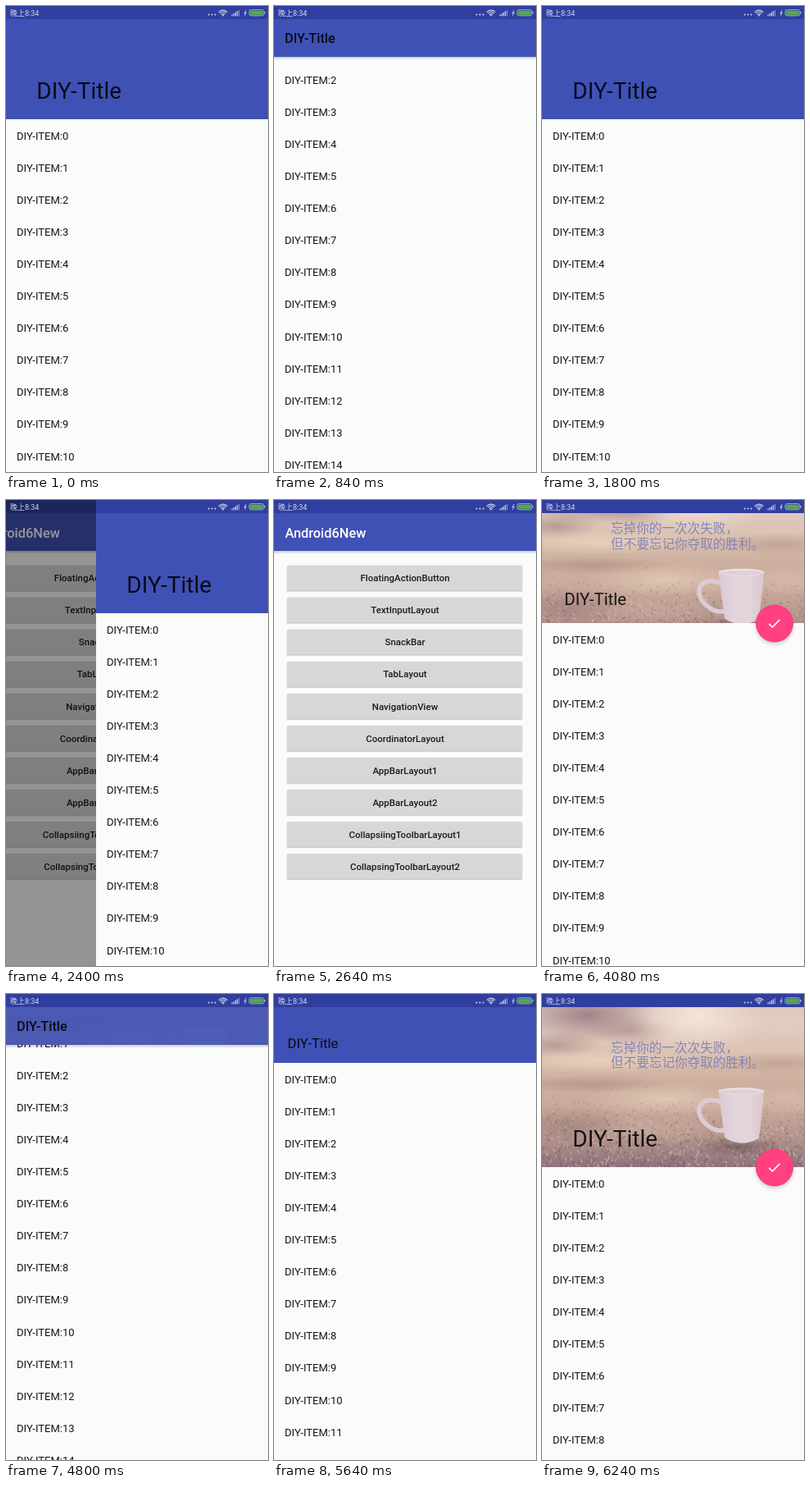
Recreate the animation shown at these times as an HTML page with a canvas. Size 320x568 px, loop 6.72 s.

```html
<!DOCTYPE html>
<html lang="en">
<head>
<meta charset="utf-8">
<title>Collapsing toolbar</title>
<style>
html, body { margin: 0; width: 100%; height: 100%; overflow: hidden; background: #fafcfa; }
canvas { display: block; width: 320px; height: 568px; }
</style>
</head>
<body>
<canvas id="stage"></canvas>
<script>
const W = 320, H = 568, LOOP = 6720, STEP = 120;
const STATUS = 16, BAR_MIN = 62;
const BLUE = '#3f51b5', DARK_BLUE = '#303f9f', PAPER = '#fafcfa', INK = '#141414';
const SANS = 'Roboto, sans-serif', CJK = '"Noto Sans CJK SC", "Noto Sans CJK", sans-serif';
const BUTTONS = ['FloatingActionButton', 'TextInputLayout', 'SnackBar', 'TabLayout',
  'NavigationView', 'CoordinatorLayout', 'AppBarLayout1', 'AppBarLayout2',
  'CollapsiingToolbarLayout1', 'CollapsingToolbarLayout2'];

// [time, value] pairs
const PLAIN_SCROLL = [[0, 0], [120, 6], [240, 24], [600, 112], [840, 146], [1080, 138], [1320, 84], [1560, 24], [1800, 0]];
const PHOTO_SCROLL = [[3600, 0], [3720, 4], [3840, 16], [3960, 36], [4080, 61], [4320, 118], [4560, 170],
  [4800, 210], [5040, 235], [5280, 222], [5520, 162], [5760, 92], [6000, 30], [6240, 0]];
const SLIDE_OUT = [[2280, 0], [2400, 110], [2520, 275], [2640, W]];
const SLIDE_IN = [[3120, W], [3240, 265], [3360, 122], [3480, 26], [3600, 0]];
const COLLAPSE_AT = 4260, EXPAND_AT = 5720;

const canvas = document.getElementById('stage');
const ctx = canvas.getContext('2d');
const dpr = window.devicePixelRatio || 1;
canvas.width = W * dpr;
canvas.height = H * dpr;

const clamp = (v) => Math.min(1, Math.max(0, v));
const mix = (a, b, p) => a + (b - a) * p;

function seededRandom(seed) {
  return () => {
    seed = (seed * 16807) % 2147483647;
    return seed / 2147483647;
  };
}

function track(keys, t) {
  if (t <= keys[0][0]) return keys[0][1];
  for (let i = 1; i < keys.length; i++) {
    const [t0, v0] = keys[i - 1], [t1, v1] = keys[i];
    if (t <= t1) return mix(v0, v1, (t - t0) / (t1 - t0));
  }
  return keys[keys.length - 1][1];
}

function rect(x, y, w, h, color) {
  ctx.fillStyle = color;
  ctx.fillRect(x, y, w, h);
}

function pill(x, y, w, h, r, color) {
  ctx.fillStyle = color;
  ctx.beginPath();
  ctx.roundRect(x, y, w, h, r);
  ctx.fill();
}

function disc(x, y, r, color) {
  ctx.fillStyle = color;
  ctx.beginPath();
  ctx.arc(x, y, r, 0, Math.PI * 2);
  ctx.fill();
}

function line(points, color, width) {
  ctx.strokeStyle = color;
  ctx.lineWidth = width;
  ctx.beginPath();
  points.forEach(([x, y]) => ctx.lineTo(x, y));
  ctx.stroke();
}

function text(str, x, y, font, color, align = 'left') {
  ctx.font = font;
  ctx.fillStyle = color;
  ctx.textAlign = align;
  ctx.fillText(str, x, y);
}

function gradient(x0, y0, x1, y1, colors) {
  const g = ctx.createLinearGradient(x0, y0, x1, y1);
  colors.forEach((c, i) => g.addColorStop(i / (colors.length - 1), c));
  return g;
}

function clipped(x, y, w, h, draw) {
  ctx.save();
  ctx.beginPath();
  ctx.rect(x, y, w, h);
  ctx.clip();
  draw();
  ctx.restore();
}

function glow(x, y, rx, ry, rgb, alpha) {
  ctx.save();
  ctx.translate(x, y);
  ctx.scale(rx, ry);
  const g = ctx.createRadialGradient(0, 0, 0, 0, 0, 1);
  g.addColorStop(0, `rgba(${rgb},${alpha})`);
  g.addColorStop(1, `rgba(${rgb},0)`);
  disc(0, 0, 1, g);
  ctx.restore();
}

function barShadow(y, alpha) {
  rect(0, y, W, 4, gradient(0, y, 0, y + 4, [`rgba(0,0,0,${alpha})`, 'rgba(0,0,0,0)']));
}

function drawStatusIcons() {
  const pale = '#d5d9ee';
  text('晚上8:34', 5, 11.6, `9px Roboto, ${CJK}`, pale);
  [248, 252, 256].forEach((x) => disc(x - 0.5, 10.5, 1, pale));
  ctx.lineCap = 'round';
  [2.5, 4.7, 6.9].forEach((r) => {
    ctx.strokeStyle = pale;
    ctx.lineWidth = 1.1;
    ctx.beginPath();
    ctx.arc(265, 12, r, -Math.PI * 0.76, -Math.PI * 0.24);
    ctx.stroke();
  });
  disc(265, 11.5, 1, pale);
  ctx.lineCap = 'butt';
  for (let i = 0; i < 5; i++) rect(275.5 + i * 2.1, 10.5 - i * 1.4, 1.2, 1.8 + i * 1.4, i < 4 ? pale : '#8c97cf');
  line([[293.3, 5], [291, 8.8], [293.4, 8.3], [291.3, 11.8]], pale, 0.9);
  ctx.strokeStyle = '#b9cfc4';
  ctx.lineWidth = 0.8;
  ctx.beginPath();
  ctx.roundRect(297, 4.6, 18, 7.2, 2.4);
  ctx.stroke();
  pill(298.2, 5.7, 15.6, 5, 1.5, '#55ac45');
  rect(315.4, 6.9, 1.1, 2.6, '#b9cfc4');
}

function drawMenu(pressed) {
  rect(0, 0, W, H, PAPER);
  rect(0, 0, W, BAR_MIN, BLUE);
  rect(0, 0, W, STATUS, DARK_BLUE);
  barShadow(BAR_MIN, 0.2);
  text('Android6New', 13.4, 45.8, `500 16.4px ${SANS}`, '#fff');
  BUTTONS.forEach((label, i) => {
    const y = 79.5 + i * 39.05;
    pill(15, y + 0.6, 289, 32, 2.5, 'rgba(0,0,0,.07)');
    pill(16, y + 1, 287, 31, 2, 'rgba(0,0,0,.12)');
    pill(16, y, 287, 30.5, 2, pressed && i === 9 ? '#c4c5c5' : '#d6d7d7');
    text(label, 160, y + 19.8, `500 11.5px ${SANS}`, '#1c1c1c', 'center');
  });
}

function drawMug() {
  glow(240, 186, 56, 12, '88,64,74', 0.5);
  ctx.strokeStyle = '#dccbd5';
  ctx.lineWidth = 5.5;
  ctx.beginPath();
  ctx.moveTo(220, 132);
  ctx.bezierCurveTo(190, 121, 184, 146, 202, 160);
  ctx.quadraticCurveTo(211, 168, 224, 166);
  ctx.stroke();
  ctx.fillStyle = gradient(215, 0, 272, 0, ['#d9c8d2', '#e2d3dc', '#e4d5da', '#d9c6cc']);
  ctx.beginPath();
  ctx.moveTo(215.5, 118.5);
  ctx.lineTo(223, 175);
  ctx.quadraticCurveTo(243, 188, 265, 176);
  ctx.lineTo(271.5, 118.5);
  ctx.fill();
  ctx.fillStyle = '#efe3e6';
  ctx.beginPath();
  ctx.ellipse(243.5, 118.5, 28, 4.2, 0, 0, Math.PI * 2);
  ctx.fill();
  ctx.fillStyle = '#dfd0d6';
  ctx.beginPath();
  ctx.ellipse(243.5, 119.2, 26, 3, 0, 0, Math.PI * 2);
  ctx.fill();
}

// Blades grow longer and denser towards the viewer.
function drawGrass() {
  const random = seededRandom(41);
  for (let i = 0; i < 900; i++) {
    const depth = Math.sqrt(random());
    const x = random() * W, y = 112 + depth * 104;
    const lean = (random() - 0.5) * 7, height = 1.5 + depth * 4 * random();
    const color = random() < 0.5 ? 'rgba(238,213,196,.38)' : 'rgba(98,70,78,.34)';
    line([[x, y], [x + lean, y - height]], color, 0.8 + depth * 0.6);
  }
}

function drawPhoto() {
  rect(0, 0, W, 211, gradient(0, 0, 0, 211,
    ['#d2bab4', '#e0cbc0', '#dcc3b3', '#cdb09f', '#c8aa9b', '#b3948c', '#8d727a']));
  glow(55, 26, 85, 34, '136,104,116', 0.7);
  glow(110, 44, 55, 18, '150,118,122', 0.45);
  glow(16, 62, 55, 16, '148,116,116', 0.5);
  glow(190, 26, 85, 46, '252,238,226', 0.75);
  glow(300, 30, 70, 28, '228,206,198', 0.5);
  glow(70, 82, 120, 15, '240,217,193', 0.65);
  glow(290, 84, 80, 14, '172,136,128', 0.45);
  glow(60, 110, 100, 11, '158,124,114', 0.45);
  glow(150, 128, 95, 20, '238,214,194', 0.6);
  glow(300, 128, 60, 18, '224,198,182', 0.45);
  glow(30, 158, 80, 24, '128,98,102', 0.35);
  glow(130, 166, 75, 18, '216,188,170', 0.35);
  drawGrass();
  drawMug();
  const font = `300 15.6px ${CJK}`;
  text('忘掉你的一次次失败，', 84, 70.5, font, 'rgba(112,118,184,.8)');
  text('但不要忘记你夺取的胜利。', 84, 89, font, 'rgba(112,118,184,.8)');
}

function drawFab(y, scale) {
  if (scale <= 0) return;
  ctx.save();
  ctx.translate(284, y);
  ctx.scale(scale, scale);
  ctx.globalAlpha = scale;
  glow(0, 2.5, 26.5, 26.5, '0,0,0', 0.6);
  disc(0, 0, 23, '#ff4081');
  line([[-6.8, 0.4], [-2.6, 4.5], [6.4, -4.6]], '#fff', 1.6);
  ctx.restore();
}

function drawTitle(barBottom, fraction) {
  // Size eases out while the position moves evenly.
  const size = mix(28, 16.4, 1 - (1 - fraction) ** 2);
  const collapsed = fraction > 0.99;
  const expandedY = barBottom - 35;
  text('DIY-Title', mix(37.3, 13, fraction), expandedY + 0.4 + size * 0.355,
    `${collapsed ? 500 : 400} ${size}px ${SANS}`, 'rgba(0,0,0,.87)');
}

function drawDetail(expanded, scroll, photo) {
  const range = expanded - BAR_MIN;
  const offset = Math.min(scroll, range);
  const bottom = expanded - offset;
  const fraction = offset / range;
  rect(0, 0, W, H, PAPER);
  clipped(0, bottom, W, H - bottom, () => {
    for (let i = 0; i < 20; i++) {
      text(`DIY-ITEM:${i}`, 13, expanded - scroll + 25 + i * 39.05, `13px ${SANS}`, INK);
    }
  });
  clipped(0, 0, W, bottom, () => {
    rect(0, 0, W, bottom, BLUE);
    if (!photo) return;
    ctx.save();
    ctx.translate(0, -offset / 2);
    drawPhoto();
    ctx.restore();
    ctx.globalAlpha = photo.scrim;
    rect(0, 0, W, bottom, BLUE);
    ctx.globalAlpha = 1;
  });
  if (fraction >= 1) barShadow(bottom, 0.2);
  rect(0, 0, W, STATUS, DARK_BLUE);
  // The collapsed title is centred in the toolbar, 23px above its bottom edge.
  drawTitle(bottom + 12 * fraction, fraction);
  if (photo) drawFab(bottom + 0.5, photo.fab);
}

function drawSlide(x, pressed, drawTop) {
  const shown = 1 - x / W;
  ctx.save();
  ctx.translate(-71 * shown, 0);
  drawMenu(pressed);
  ctx.restore();
  if (shown <= 0) return;
  rect(0, 0, x, H, `rgba(0,0,0,${0.63 * shown})`);
  ctx.save();
  ctx.translate(x, 0);
  clipped(0, 0, W, H, drawTop);
  ctx.restore();
}

function render(t) {
  ctx.setTransform(dpr, 0, 0, dpr, 0, 0);
  ctx.clearRect(0, 0, W, H);
  if (t < 2400) {
    drawDetail(138, track(PLAIN_SCROLL, t));
  } else if (t < 3000) {
    drawSlide(track(SLIDE_OUT, t), false, () => drawDetail(138, 0));
  } else {
    const photo = {
      scrim: clamp((t - COLLAPSE_AT) / 600) * (1 - clamp((t - EXPAND_AT) / 500)),
      fab: 1 - clamp((t - COLLAPSE_AT) / 200) + clamp((t - EXPAND_AT) / 200)
    };
    const drawTop = () => drawDetail(211, track(PHOTO_SCROLL, t), photo);
    if (t < 3600) drawSlide(track(SLIDE_IN, t), true, drawTop);
    else drawTop();
  }
  drawStatusIcons();
}

const start = performance.now();
function tick() {
  const t = (performance.now() - start) % LOOP;
  render(Math.floor(t / STEP) * STEP);
  requestAnimationFrame(tick);
}
tick();
</script>
</body>
</html>
```
